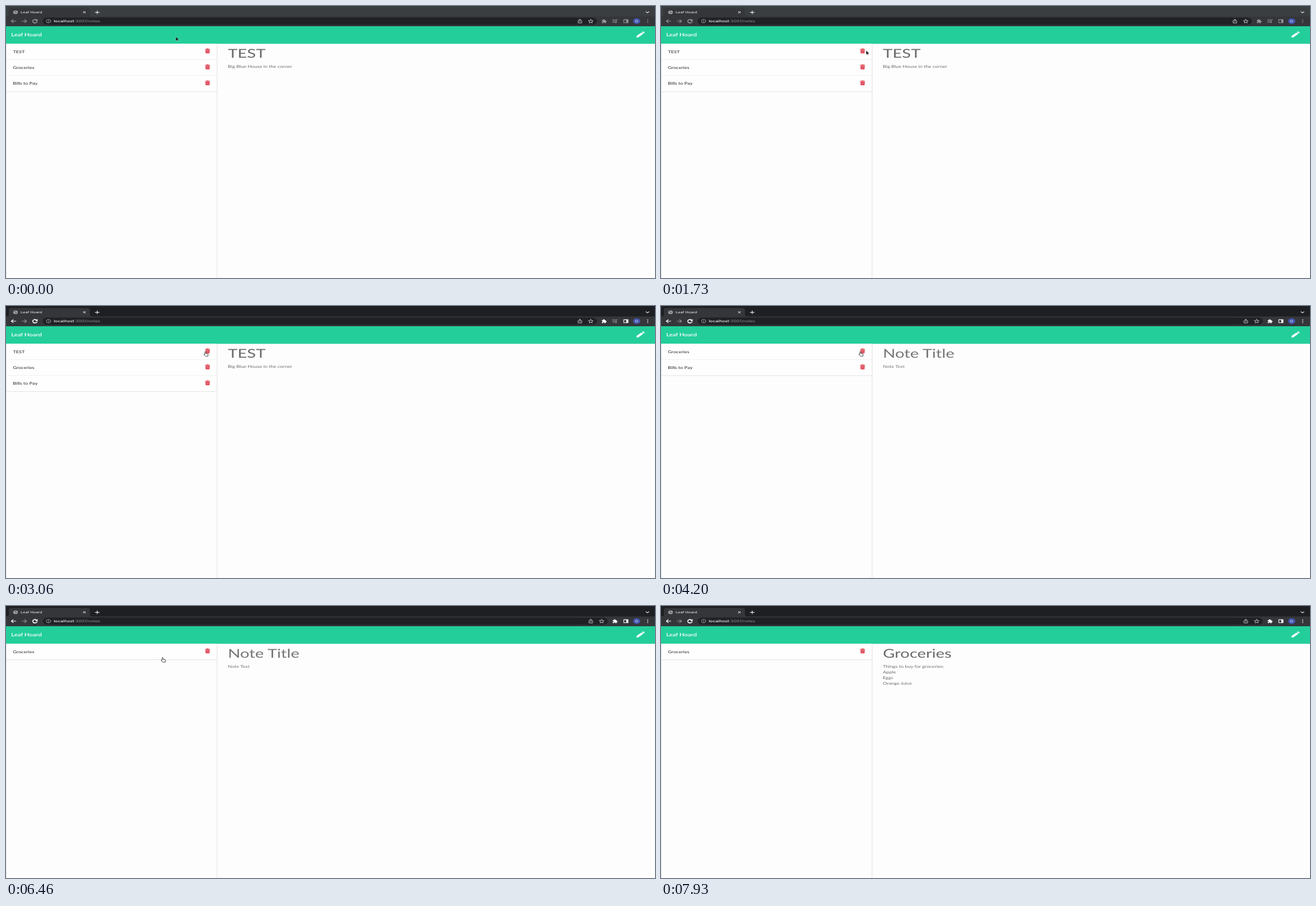
Animation of 1156 by 484 pixels, one loop 8000 ms. Source, as an HTML page:

```html
<!DOCTYPE html>
<html lang="en">
<head>
<meta charset="utf-8">
<title>Leaf Hoard</title>
<style>
  html, body { margin: 0; width: 100%; height: 100%; overflow: hidden; background: #fdfdfd; }
  svg { display: block; width: 1156px; height: 484px; }

  text {
    font-family: Lato, sans-serif;
    font-size: 6.75px;
    text-rendering: geometricPrecision;
    transform-box: fill-box;
    transform-origin: 0 0;
    transform: scaleX(1.35);
  }
  .ui { font-family: Inter, Roboto, sans-serif; }
  .tab { font-size: 5.35px; font-weight: 500; }
  .url { font-size: 6.2px; }
  .brand { font-size: 8.4px; font-weight: 600; fill: #fff; }
  .item { font-weight: 500; fill: #33363a; }
  .head { font-size: 21.6px; }
  .note { fill: #68696a; }
  .hint { fill: #747576; }
  .line { fill: none; stroke: currentColor; stroke-linecap: round; stroke-linejoin: round; }
  .rule { fill: none; stroke: #e0e1e2; }

  .strip, .live, .wide, .media, .first, .rest, .last,
  .blank, .groceries, .cursor, .arrow, .hand {
    animation: 8s step-end -7ms infinite;
  }
  .strip { animation-name: strip; }
  .live { animation-name: live; }
  .wide { animation-name: wide; }
  .media, .first { animation-name: first; }
  .rest { animation-name: rest; }
  .last { animation-name: last; }
  .blank { animation-name: blank; }
  .groceries { animation-name: groceries; }
  .cursor { animation-name: move; }
  .arrow { animation-name: arrow; }
  .hand { animation-name: hand; }

  @keyframes strip { 0% { fill: #3b3e41 } 25%, to { fill: #1e1f22 } }
  @keyframes live { 0% { color: #94969a } 25%, to { color: #fff } }
  @keyframes wide { 0% { transform: none } 47.5%, to { transform: translateX(19.4px) } }
  @keyframes first { 0% { visibility: visible } 47.5%, to { visibility: hidden } }
  @keyframes rest { 0% { transform: translateY(28.4px) } 47.5%, to { transform: none } }
  @keyframes last { 0% { visibility: visible } 71.667%, to { visibility: hidden } }
  @keyframes blank {
    0% { visibility: hidden }
    47.5% { visibility: visible }
    91.667%, to { visibility: hidden }
  }
  @keyframes groceries { 0% { visibility: hidden } 91.667%, to { visibility: visible } }
  @keyframes arrow {
    0% { visibility: visible }
    28.333% { visibility: hidden }
    95.833% { visibility: visible }
    99.167%, to { visibility: hidden }
  }
  @keyframes hand {
    0% { visibility: hidden }
    28.333% { visibility: visible }
    95.833%, to { visibility: hidden }
  }
  /* The pointer is sampled 15 times a second. */
  @keyframes move {
    0% { transform: translate(302.5px, 55px) }
    .833% { transform: translate(302.5px, 55px); animation-timing-function: steps(14, start) }
    12.5% { transform: translate(409.5px, 80px); animation-timing-function: steps(5, start) }
    16.667% { transform: translate(405px, 86px) }
    17.5% { transform: translate(405px, 86px); animation-timing-function: steps(6, start) }
    22.5% { transform: translate(365.5px, 79.5px) }
    25% { transform: translate(365.5px, 79.5px); animation-timing-function: steps(5, start) }
    29.167% { transform: translate(355.5px, 82px) }
    32.5% { transform: translate(355.5px, 82px); animation-timing-function: steps(9, start) }
    40% { transform: translate(355px, 81.5px) }
    55.833% { transform: translate(355px, 81.5px); animation-timing-function: steps(13, start) }
    66.667% { transform: translate(360px, 106px); animation-timing-function: steps(3, start) }
    69.167% { transform: translate(359px, 107.5px) }
    78.333% { transform: translate(359px, 107.5px); animation-timing-function: steps(4, start) }
    81.667% { transform: translate(279px, 92px); animation-timing-function: steps(5, start) }
    85.833% { transform: translate(205px, 82px) }
    94.167% { transform: translate(205px, 82px); animation-timing-function: steps(6, start) }
    99.167%, to { transform: translate(290px, 180px) }
  }
</style>
</head>
<body>
<svg viewBox="0 0 1156 484" xmlns="http://www.w3.org/2000/svg">
  <defs>
    <g id="row">
      <path d="M0 67H376V95.5H0Z" fill="#fefefe"/>
      <path class="rule" d="M0 95.5H376"/>
      <g fill="#dd4452">
        <path d="M354.6 76.4H357L357.7 75.6H360.3L361 76.4H363.4V77.7H354.6Z"/>
        <path d="M355.2 78.2H362.9L362.6 83.6Q362.5 84.3 361.7 84.3H356.4Q355.6 84.3 355.5 83.6Z"/>
      </g>
      <path d="M357.2 79.4V83M359 79.4V83M360.9 79.4V83" stroke="#f0a4ab" stroke-width=".5"/>
    </g>
  </defs>

  <!-- Browser -->
  <path class="strip" d="M0 0H1156V20H0Z"/>
  <path d="M0 18.6H1V18.6Q5 18.6 5 15V7Q5 3.4 9.5 3.4H145Q149.5 3.4 149.5 7V15Q149.5 18.6 153.5 18.6H1156V36H0Z" fill="#35363a"/>
  <ellipse cx="17" cy="11.2" rx="4.2" ry="3.1" fill="#a3a6aa"/>
  <path d="M14 10.6Q16 8.6 17.4 10T15.8 12M17.6 12.6Q18.6 10.6 20.2 11.4" fill="none" stroke="#4a4c50" stroke-width=".9"/>
  <text class="ui tab" x="26" y="13.1" fill="#dfe1e4">Leaf Hoard</text>
  <g class="line" color="#e4e5e7">
    <path d="M137.6 9.7L141.6 12.7M141.6 9.7L137.6 12.7"/>
    <path d="M159 11.3H166M162.5 8.6V14" stroke-width="1.2"/>
    <path d="M1140 10.2L1142.6 12.2 1145.2 10.2" stroke-width="1.1"/>
  </g>

  <g class="live">
    <g class="line" stroke-width="1.1">
      <path d="M17.6 27H9.6M13 24.3L9.4 27 13 29.7"/>
      <path d="M55.2 25.6A4.1 3 0 1 0 55.5 28.2" stroke-width="1.2"/>
    </g>
    <path d="M56.2 23.6V26.7H52Z" fill="currentColor"/>
  </g>
  <path class="line" color="#8d8f93" d="M28.6 27H36.6M33 24.3L36.8 27 33 29.7" stroke-width="1.1"/>

  <rect class="wide" x="60" y="20.8" width="992.5" height="12.4" rx="8" ry="6.2" fill="#202124"/>
  <rect x="65.5" y="20.8" width="960" height="12.4" rx="8" ry="6.2" fill="#202124"/>
  <path d="M50 20.8H66Q66 20.8 73 20.8Q65.5 21.5 65.5 27T73 33.2H58V20.8Z" fill="#35363a"/>
  <g class="live">
    <path class="line" d="M55.2 25.6A4.1 3 0 1 0 55.5 28.2" stroke-width="1.2"/>
    <path d="M56.2 23.6V26.7H52Z" fill="currentColor"/>
  </g>
  <g class="line" color="#b4b7bb" stroke-width=".8">
    <ellipse cx="75.8" cy="27" rx="4" ry="3.1"/>
    <path d="M75.8 26.7V28.6M75.8 25.3V25.4"/>
  </g>
  <text class="ui url" x="85" y="29.3" fill="#8e9196"><tspan fill="#f0f1f2" font-weight="500">localhost</tspan>:3001/notes</text>

  <g class="wide">
    <g class="line" color="#d0d2d5" stroke-width=".9">
      <path d="M1020.4 26H1019V30.2H1025.4V26H1024M1022.2 28.2V23.6M1020.5 24.8L1022.2 23.5 1023.9 24.8"/>
      <path transform="translate(1041.6 27.1)" d="M0-3.5L1.2-1.1 4.3-1 1.9.8 2.7 3.2 0 1.9-2.7 3.2-1.9.8-4.3-1-1.2-1.1Z"/>
    </g>
    <g class="live">
      <path fill="currentColor" d="M1061.4 25H1063.4Q1063.2 23.4 1064.8 23.4T1066.2 25H1068.2V26.8Q1070 26.7 1070 27.7T1068.2 28.7V30.4H1065.9Q1065.8 29 1064.8 29T1063.6 30.4H1061.4V28.6Q1062.9 28.5 1062.9 27.6T1061.4 26.7Z"/>
    </g>
  </g>
  <g class="media" color="#8d8f93">
    <path class="line" d="M1080.6 24.6H1086M1080.6 26.8H1086M1080.6 29H1083.6M1087.2 29V24.4H1089.2"/>
    <ellipse cx="1086.2" cy="29.2" rx="1.5" ry="1.1" fill="currentColor"/>
  </g>
  <g class="live">
    <path class="line" d="M1100.4 24.4H1108V29.8H1100.4Z" stroke-width="1.1"/>
    <path d="M1104.8 24.4H1108V29.8H1104.8Z" fill="currentColor"/>
    <g fill="currentColor">
      <ellipse cx="1143" cy="24.6" rx=".95" ry=".75"/>
      <ellipse cx="1143" cy="27" rx=".95" ry=".75"/>
      <ellipse cx="1143" cy="29.4" rx=".95" ry=".75"/>
    </g>
  </g>
  <ellipse cx="1123.4" cy="27" rx="6.4" ry="4.9" fill="#4657b0"/>
  <text class="ui tab" x="1120.7" y="28.9" fill="#d5daf3">D</text>

  <!-- Page -->
  <path d="M0 36H1156V67.3H0Z" fill="#24ce9b"/>
  <text class="brand" x="9.2" y="54.1">Leaf Hoard</text>
  <g fill="#fff">
    <path d="M1122.8 56.3L1123.6 52.8 1131.9 47.2 1135 49.5 1126.9 55.4Z"/>
    <path d="M1132.7 46.6L1134 45.7Q1135 45 1136 45.7L1137.1 46.6Q1137.9 47.3 1137.1 48L1135.8 48.9Z"/>
  </g>

  <g class="first">
    <use href="#row"/>
    <text class="item" x="12.4" y="83.5">TEST</text>
  </g>
  <g class="rest">
    <use href="#row"/>
    <text class="item" x="12.2" y="83.5">Groceries</text>
    <g class="last">
      <use href="#row" y="28.4"/>
      <text class="item" x="12.2" y="111.9">Bills to Pay</text>
    </g>
  </g>
  <path class="rule" d="M.5 67.3V484M376 67.3V484"/>

  <g class="note first">
    <text class="head" x="395.3" y="92.4">TEST</text>
    <text x="395.2" y="109.5">Big Blue House in the corner</text>
  </g>
  <g class="hint blank">
    <text class="head" x="395.3" y="92.4">Note Title</text>
    <text x="395.2" y="109.5">Note Text</text>
  </g>
  <g class="note groceries">
    <text class="head" x="395.3" y="92.4">Groceries</text>
    <text x="395.2" y="109.5">Things to buy for groceries:</text>
    <text x="395.2" y="119.6">Apple</text>
    <text x="395.2" y="129.7">Eggs</text>
    <text x="395.2" y="139.8">Orange Juice</text>
  </g>

  <g class="cursor">
    <path class="arrow" d="M0 0V6.6L1.7 5.3 2.7 7.6 3.9 7.1 2.9 4.9 5 4.8Z" fill="#111" stroke="#fff" stroke-width=".7" paint-order="stroke"/>
    <path class="hand" d="M-.9.6Q-.9-.3 0-.3T.9.6V3L4 3.5Q5.3 3.8 5.1 5L4.4 8H.4L-2.3 5.3Q-3 4.4-2 4L-.9 4.6Z" fill="#fff" stroke="#2a2a2a" stroke-width=".9"/>
  </g>
</svg>
</body>
</html>
```
